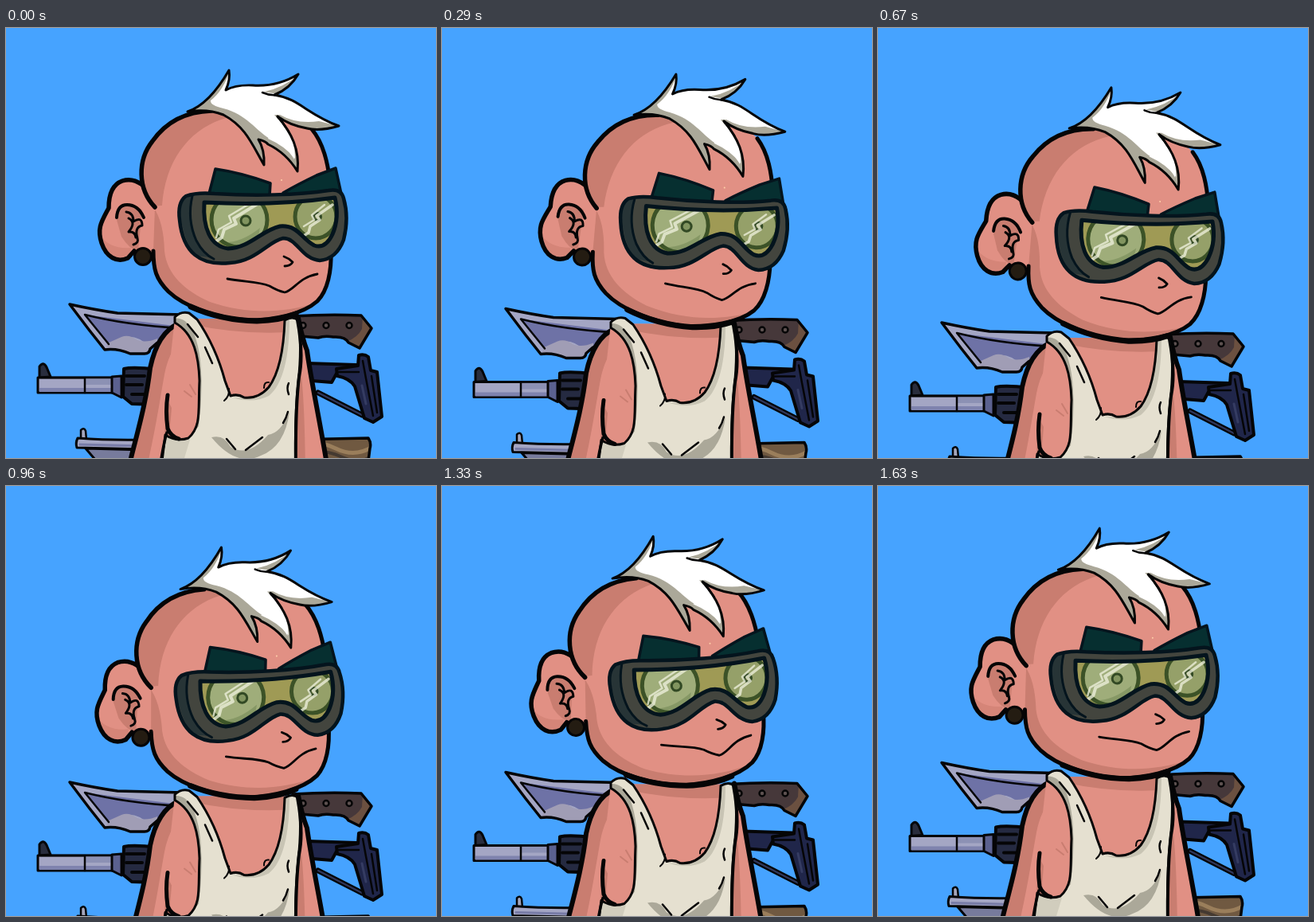
Write an HTML page with a canvas that moves like this. It is 540x540 px and loops after 1.67 s.

```html
<!DOCTYPE html>
<html lang="en">
<head>
<meta charset="utf-8">
<title>Idle character</title>
<style>
html, body { margin: 0; width: 100%; height: 100%; overflow: hidden; background: #46a3ff; }
canvas { display: block; width: 540px; height: 540px; }
</style>
</head>
<body>
<canvas id="stage" width="540" height="540"></canvas>
<script>
const ctx = document.getElementById('stage').getContext('2d');
const LOOP = 1670, STEPS = 40, FRAME = 1000 / 24;
const INK = '#050506', NAVY = '#04141d';
const SKIN = '#e19084', SHADE = '#c97d70';
const STEEL = '#a4a6c4', STEEL_DARK = '#6e72a6';
const CLOTH = '#e5e0d0', CLOTH_SHADE = '#aba899';

// Poses at a few steps of the loop, joined by a smooth periodic curve.
const keys = [0, 7, 12, 16, 23, 32, 39];
const bob = [0, 6.5, 18, 24, 24.5, 9.5, 0];
const gearBob = [0, 5.5, 16.5, 23, 25, 12.5, 0.5];
const tilt = [0, 0.0516, 0.068, 0.048, -0.0355, -0.055, -0.0065];

function sample(values, step) {
  const n = keys.length;
  const time = i => keys[(i + n) % n] + STEPS * Math.floor(i / n);
  const value = i => values[(i + n) % n];
  const slope = i => (value(i + 1) - value(i - 1)) / (time(i + 1) - time(i - 1));
  let i = n - 1;
  while (keys[i] > step) i--;
  const span = time(i + 1) - time(i), u = (step - time(i)) / span, v = 1 - u;
  return v * v * (1 + 2 * u) * value(i) + u * u * (3 - 2 * u) * value(i + 1)
    + span * u * v * (v * slope(i) - u * slope(i + 1));
}

const cache = {};
const path = d => cache[d] || (cache[d] = new Path2D(d));

function shape(d, fill, width = 0, ink = INK) {
  if (fill) { ctx.fillStyle = fill; ctx.fill(path(d)); }
  if (width) { ctx.lineWidth = width; ctx.strokeStyle = ink; ctx.stroke(path(d)); }
}
const line = (d, width, ink) => shape(d, null, width, ink);

function oval(x, y, rx, ry, fill, width = 0, ink = INK) {
  ctx.beginPath();
  ctx.ellipse(x, y, rx, ry, 0, 0, Math.PI * 2);
  if (fill) { ctx.fillStyle = fill; ctx.fill(); }
  if (width) { ctx.lineWidth = width; ctx.strokeStyle = ink; ctx.stroke(); }
}

// Draws inside an outline, then inks the outline on top.
function clipped(d, fill, width, inside, ink) {
  shape(d, fill);
  ctx.save();
  ctx.clip(path(d));
  inside();
  ctx.restore();
  if (width) line(d, width, ink);
}

function drawKnife() {
  clipped('M80 347Q112 354 140 358L222 360V377L189 396L181 403Q180 409 174 409L156 409Q140 402 124 404L105 380Z', STEEL, 3.5, () => {
    shape('M99 360L220 375V400L180 400Q166 386 151 388Q140 394 129 397Z', STEEL_DARK);
    shape('M127 396L145 388Q154 384 165 392Q176 396 190 390V415H124Z', '#a09db5');
    line('M129 397L99 360Q150 373 220 377', 2.5);
  });
  clipped('M360 362Q405 359 446 361L459 377L444 402L430 395Q426 387 411 388Q400 386 392 389L360 386Z', '#46383a', 3.5, () => {
    shape('M448 360L460 376L444 403L428 394Q442 388 447 378Z', '#6b5040');
  });
  for (const x of [373, 402, 431]) oval(x, 373.5, 3.5, 3.5, '#5d5150', 2.5);
}

function drawRifle() {
  shape('M42 439L42 425Q47 418 51 426L56 438Z', '#292d3d', 3);
  shape('M40 439H138V458H40Z', STEEL, 3);
  shape('M42 452H136V457H42Z', '#7f83ae');
  shape('M100 440H134V448H100Z', '#8c91b4');
  line('M99 439V458M43 439H134', 2.5);
  shape('M133 438L145 437V464L133 458Z', '#5b618f', 3);
  shape('M148 428Q160 425 190 429V473L158 472L147 463Z', '#252a41', 4);
  line('M151 437H174M151 448H171M158 460H174', 4, INK);

  shape('M378 421L440 423V432L415 434L409 445L384 443Z', '#20264a', 4);
  line('M392 458L447 486', 7);
  line('M392 458L447 486', 2, '#30375b');
  shape('M443 411Q450 409 455 413L458 430L466 432L472 488L461 495L450 490L438 450Q432 440 416 437L415 428L442 424Z', '#20264a', 4);
  line('M448 418L452 440L461 487M459 437L466 483M418 432L443 432', 2.5);
  line('M447 449L452 472', 3, '#353c62');
}

function drawShotgun() {
  shape('M94 516V505Q98 501 100 506L101 517Z', '#a4a6bc', 2.5);
  shape('M90 515Q130 518 175 517V529L89 527Q87 521 90 515Z', STEEL, 3);
  line('M93 523L172 525', 3, '#787ca7');
  shape('M100 528L175 530V542H112Z', '#777b9c', 3);
  clipped('M360 517L455 515Q459 521 457 528L453 560H360Z', '#705941', 3.5, () => {
    line('M366 524Q390 516 414 528T460 526', 5, '#9a7e5b');
    line('M370 539Q394 526 420 538T460 536', 4, '#453a31');
  });
}

function drawBody() {
  const armEdge = 'M217 371C196 380 186 403 181 427C176 470 166 504 157 540L152 560';
  clipped(armEdge + 'H194L204 512L219 500Z', SKIN, 0, () => {
    shape('M217 365C178 390 166 471 145 560H175C188 505 193 468 199 435C204 410 213 395 232 380Z', SHADE);
  });
  line(armEdge, 6);

  clipped('M356 366H367C376 390 381 423 385 446C390 480 399 515 405 560H358Z', SKIN, 0, () => {
    shape('M362 385C372 420 375 470 376 560H358Z', SHADE);
  });
  line('M367 364Q372 390 378 405C383 443 395 497 405 560', 6);

  clipped('M212 365H366V480L240 535L199 512L202 455Z', SKIN, 0, () => {
    shape('M220 360H370V381Q300 387 232 372Z', SHADE);
    shape('M199 460L208 477L205 515H197Z', SHADE);
    line('M231 448L238 460M224 456L233 463', 2, SHADE);
  });

  const shirt = 'M212 363Q220 355 230 358L240 366C253 385 267 413 275 443L282 462Q291 459 299 464Q317 466 330 451C344 432 349 397 350 367Q360 361 367 367Q372 400 367 445Q362 490 364 560H194L200 511Q214 520 229 515C246 500 241 480 243 443C242 414 237 384 212 370Z';
  clipped(shirt, CLOTH, 3, () => {
    shape('M210 365Q224 362 234 379C250 412 246 470 242 500L228 517C242 490 241 420 235 397Z', CLOTH_SHADE);
    shape('M356 366C356 412 348 448 330 462Q310 472 284 464Q310 467 330 451C344 432 349 397 350 367Z', '#c8c4b4');
    shape('M258 514Q274 510 282 526Q304 540 329 511Q345 509 356 482Q350 526 320 537Q289 552 258 514Z', CLOTH_SHADE);
    shape('M198 511L231 517L218 560H190Z', '#d1cdbd');
  });
  line('M203 461Q200 481 203 503Q207 513 217 516', 5);
  line('M202 508Q197 525 192 560', 3.5);
  line('M228 372L241 388M250 401L259 421M277 516L288 529M301 530L322 514M355 446Q352 452 355 460M354 482Q352 490 348 496', 2.5);
  line('M274 468Q281 462 280 453M324 452Q324 444 330 445', 2);
  line('M366 367Q374 410 368 438Q363 480 364 560', 4);
}

function drawEar() {
  clipped('M188 224C181 198 162 187 146 192C132 197 129 211 129 226C120 243 114 251 120 270C126 288 139 295 153 289L164 279L198 290V224Z', SKIN, 0, () => {
    shape('M139 241C140 222 156 220 171 228L166 280Q155 278 145 262Z', SHADE);
    shape('M116 257Q128 278 157 276L155 298H120Z', '#d58578');
  });
  line('M187 224C181 198 162 187 146 192C132 197 129 211 129 226C120 243 114 251 120 270C126 288 139 295 153 289L161 280', 5.5);
  line('M139 238Q140 222 152 222Q166 222 173 238', 4);
  line('M151 231Q160 232 160 243Q171 236 171 248Q161 250 165 264Q167 270 160 272M154 239Q164 244 154 256Q162 255 163 263', 3);
}

const skullBack = 'M187 225C165 202 165 166 184 142C201 118 226 105 258 104';
const jaw = 'M408 280C409 305 404 330 391 343C372 360 335 367 304 367C265 365 224 350 204 331C188 315 185 303 185 280';
const skull = skullBack + 'L312 102Q362 107 386 128C399 145 404 170 408 195L419 225' + jaw.replace('M', 'L') + 'Z';

function drawHead() {
  drawEar();
  clipped(skull, SKIN, 0, () => {
    shape('M160 225V120L235 98H305Q288 110 270 115C228 130 200 168 196 223Z', SHADE);
    shape('M185 225Q198 243 199 280C202 310 225 330 256 344C306 361 350 357 387 346L360 382H200L170 320Z', SHADE);
  });
  line(skullBack, 5.5);
  line('M384 127C399 145 404 170 407 193' + jaw, 5);
  line('M232 350Q270 367 315 368Q345 367 364 359', 7);
  oval(172, 287, 10.5, 10.5, '#241c12', 3);
  line('M278 315C299 319 317 318 331 324Q341 330 350 332C362 329 368 313 391 309', 2.8);
  line('M349 287Q355 289 360 294Q357 299 350 299', 2.8);
  oval(346, 191, 1, 1, '#ffd0aa');
}

const frame = 'M218 241Q215 219 226 211Q240 206 262 208C310 211 367 210 405 204Q421 201 424 214Q431 238 424 266Q415 290 394 292C371 290 366 264 348 264C329 268 314 293 281 295C244 299 222 282 218 241Z';
const lens = 'M249 219C304 222 363 220 413 213Q419 238 410 259Q401 278 387 273C371 265 367 247 344 249C321 254 306 276 279 277C256 274 247 250 249 219Z';

function drawGoggles() {
  shape('M263 177Q297 182 332 195L331 211Q292 217 255 208Z', '#062f30', 3.5, NAVY);
  shape('M414 176L421 208Q385 217 348 207Q365 197 390 185Z', '#062f30', 3.5, NAVY);
  clipped(frame, '#43453e', 4.5, () => {
    shape('M217 209L235 211Q228 243 239 267L255 288L239 286Q219 266 217 209Z', '#273436');
    line('M234 211Q227 240 239 267Q248 284 261 290', 3, NAVY);
    line('M356 267Q360 281 376 291', 7, '#10282d');
  }, NAVY);
  clipped(lens, '#9f9a55', 5, () => {
    oval(293, 241, 35, 34, '#9fad7a', 5, '#3c5227');
    oval(389, 237, 26, 27, '#95a069', 5, '#3c5227');
    shape('M245 262Q282 281 319 251L312 284H250Z', 'rgba(69,99,49,.28)');
    oval(301, 242, 6, 6, '#81945f', 3, '#324924');
    oval(391, 237, 4.5, 4.5, '#77824e', 3, '#324924');
    ctx.globalAlpha = 0.78;
    line('M319 219L286 239L289 246L274 253L271 263L255 274', 4, '#edf0db');
    line('M307 220L280 236L283 244L267 253L264 263', 2.5, '#edf0db');
    line('M410 222L390 236L394 241L382 249L380 257L369 264', 3.5, '#edf0db');
    line('M400 222L384 235L387 241L374 249', 2.5, '#edf0db');
    ctx.globalAlpha = 1;
  }, NAVY);
}

const hair = 'M228 105C249 98 265 79 280 53Q282 65 276 78Q289 71 310 72Q341 74 367 58Q357 76 337 84C369 89 377 108 418 123Q394 130 378 126Q356 122 341 111C359 132 369 153 366 180Q352 157 329 146Q326 142 317 140Q325 153 324 172C309 146 301 124 273 109Q253 101 228 105Z';

function drawHair() {
  clipped(hair, '#fff', 3, () => {
    shape('M220 108L282 50Q274 78 257 91Q256 97 273 101C303 109 313 128 331 139Q351 146 362 165C360 139 350 125 337 109L344 109Q365 121 393 117L421 124L380 132L367 185L321 179L270 109Z', CLOTH_SHADE);
    shape('M324 80Q349 75 368 58L353 81Q344 84 324 80Z', CLOTH_SHADE);
    shape('M344 111C359 132 363 147 363 164Q350 148 329 139Z', '#fff');
  });
  line('M322 81Q331 85 340 84M341 111Q348 119 355 130', 2.5);
}

function shifted(x, y, angle, px, py, draw) {
  ctx.save();
  ctx.translate(px + x, py + y);
  ctx.rotate(angle);
  ctx.translate(-px, -py);
  draw();
  ctx.restore();
}

function render(now) {
  const step = Math.min(STEPS - 1, Math.floor((now % LOOP + 5) / FRAME));
  const drop = sample(bob, step), angle = sample(tilt, step);
  ctx.fillStyle = '#46a3ff';
  ctx.fillRect(0, 0, 540, 540);
  ctx.lineJoin = ctx.lineCap = 'round';
  shifted(0, sample(gearBob, step), 0, 0, 0, () => { drawShotgun(); drawRifle(); drawKnife(); });
  shifted(0, drop, 0, 0, 0, drawBody);
  shifted(0, drop, angle, 290, 362, () => { drawHead(); drawGoggles(); });
  // The hair swings with the head but turns and drops a little less.
  shifted(250 * angle, 0.95 * drop, 0.3 * angle, 352, 117, drawHair);
}

function loop() {
  render(performance.now());
  requestAnimationFrame(loop);
}
loop();
</script>
</body>
</html>
```
